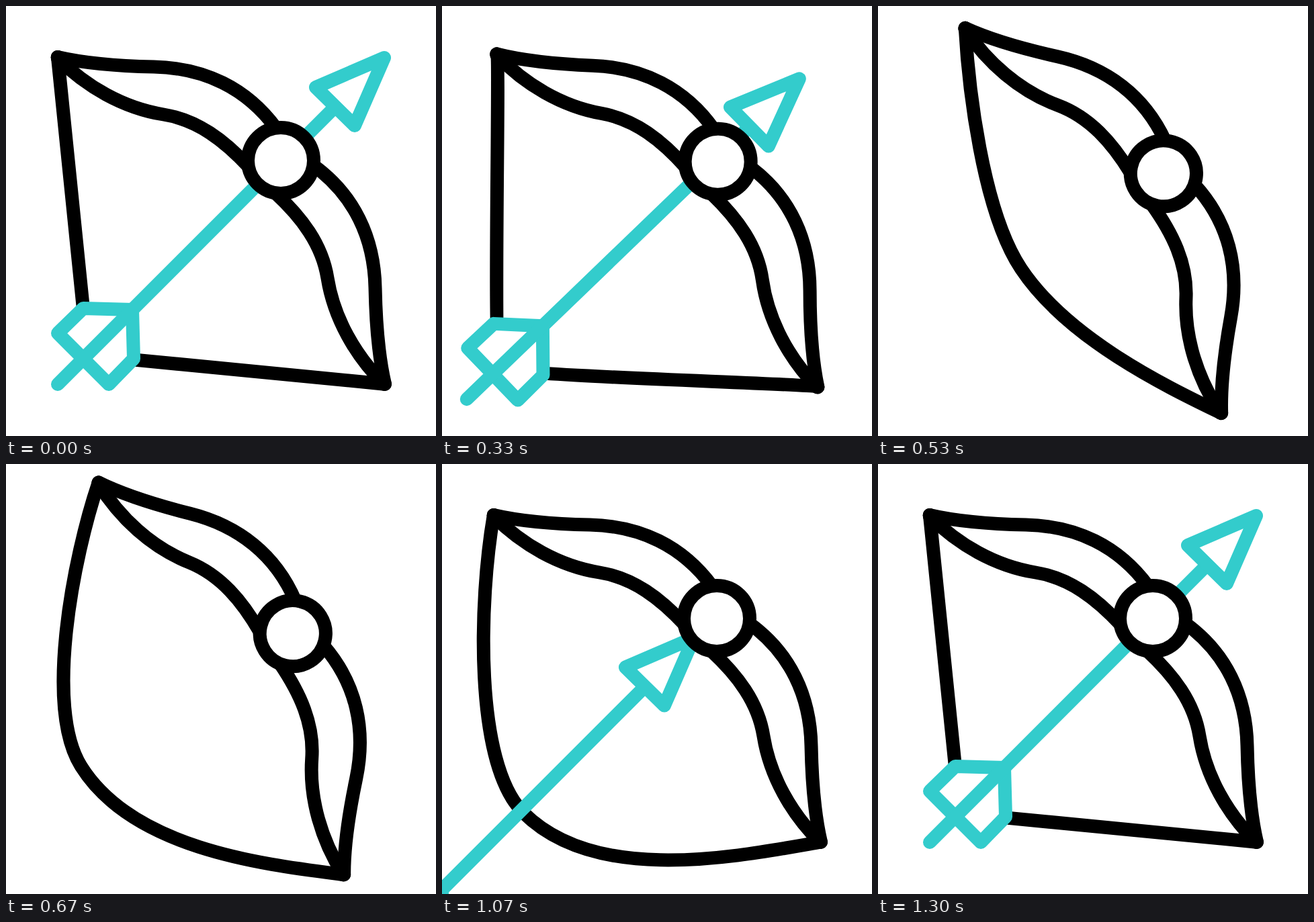
An HTML page that plays this animation: 640x640 px, repeating every 1670 ms.

```html
<!DOCTYPE html>
<html lang="en">
<head>
<meta charset="utf-8">
<title>Bow and arrow</title>
<style>
html, body { margin: 0; width: 100%; height: 100%; overflow: hidden; background: #fff; }
svg { display: block; width: 100%; height: 100%; }
.ink { stroke: #000; }
.teal { stroke: #33cccc; }
</style>
</head>
<body>
<svg viewBox="0 0 640 640" fill="none" stroke-width="20" stroke-linecap="round" stroke-linejoin="round">
  <defs>
    <g id="limb">
      <path fill="#fff" stroke="none" d="M77 76C120 86 170 89.5 220 90.5C295 92 358 122 402 182L362 240C325 200 285 169 234.5 161.5C175 152 119 120 77 77.5Z"/>
      <path d="M77 76C120 86 170 89.5 220 90.5C295 92 358 122 402 182"/>
      <path d="M77 77.5C119 120 175 152 234.5 161.5C285 169.5 325 200 362 240"/>
      <circle cx="77" cy="76.5" r="10.5" fill="#000" stroke="none"/>
    </g>
  </defs>
  <g id="stringTurn">
    <path id="string" class="ink" transform="translate(320.3 319.3) rotate(45)"/>
  </g>
  <g id="arrow" class="teal">
    <path fill="#fff" d="M77 487L115 450L188 452L190 525L153 563Z"/>
    <path d="M77 563L489 151"/>
    <path fill="#fff" d="M563 77L461 121L519 178Z"/>
  </g>
  <g id="bow" class="ink">
    <use href="#limb"/>
    <use href="#limb" transform="matrix(0 -1 -1 0 640 639.5)"/>
    <circle cx="409" cy="230" r="49" fill="#fff"/>
  </g>
</svg>
<script>
const LOOP = 1670, STEP = 33.4, HALF = 344.2;
const $ = id => document.getElementById(id);
const string = $('string'), stringTurn = $('stringTurn'), arrow = $('arrow'), bow = $('bow');

// String poses: tip handle (along, deep), left and right nock handles, nock (along, deep)
const REST = [0, 0, 0, 0, 1.6, 282];
const PULLED = [0, 0, 0, 0, -5.7, 364];
const SNAP = [74, 25, 104, 120, 0, 83];
const SLACK = [74, 105, 104, 153, 0, 282];

// Keys: [time in steps, values]
const stringKeys = [[0, REST], [9, PULLED], [13, SNAP], [22.6, SLACK], [32, SLACK], [39, REST]];
const outKeys = [[0, [0, 0]], [9, [-57.5, 49.2]], [18.5, [665, -656]]];
const backKeys = [[18.5, [-833, 804]], [38, [0, 0]]];
const turnKeys = [[8.2, [0]], [18.6, [13.5]], [18.9, [13.5]], [28.2, [0]]];

function ease(p) {
  p = Math.min(1, Math.max(0, p));
  return p * p * (3 - 2 * p);
}

function at(keys, f) {
  let i = 0;
  while (i < keys.length - 2 && f >= keys[i + 1][0]) i++;
  const [t0, a] = keys[i], [t1, b] = keys[i + 1];
  const k = ease((f - t0) / (t1 - t0));
  return a.map((v, n) => v + (b[n] - v) * k);
}

function stringPath([a, s, left, right, u, d]) {
  return `M${-HALF} 0C${a - HALF} ${s} ${u - left} ${d} ${u} ${d}` +
    `C${u + right} ${d} ${HALF - a} ${s} ${HALF} 0`;
}

function draw(ms) {
  const f = Math.floor((ms % LOOP + 4.5) / STEP) % 50;
  const turn = `rotate(${at(turnKeys, f)[0]} 320.3 319.3)`;
  const leaving = f < 18.5;
  const [x, y] = at(leaving ? outKeys : backKeys, f);
  string.setAttribute('d', stringPath(at(stringKeys, f)));
  stringTurn.setAttribute('transform', turn);
  bow.setAttribute('transform', turn);
  arrow.setAttribute('transform', `${leaving ? turn : ''} translate(${x} ${y})`);
}

let start;
function tick(now) {
  start ??= now;
  draw(Math.max(0, now - start));
  requestAnimationFrame(tick);
}
draw(0);
requestAnimationFrame(tick);
</script>
</body>
</html>
```
